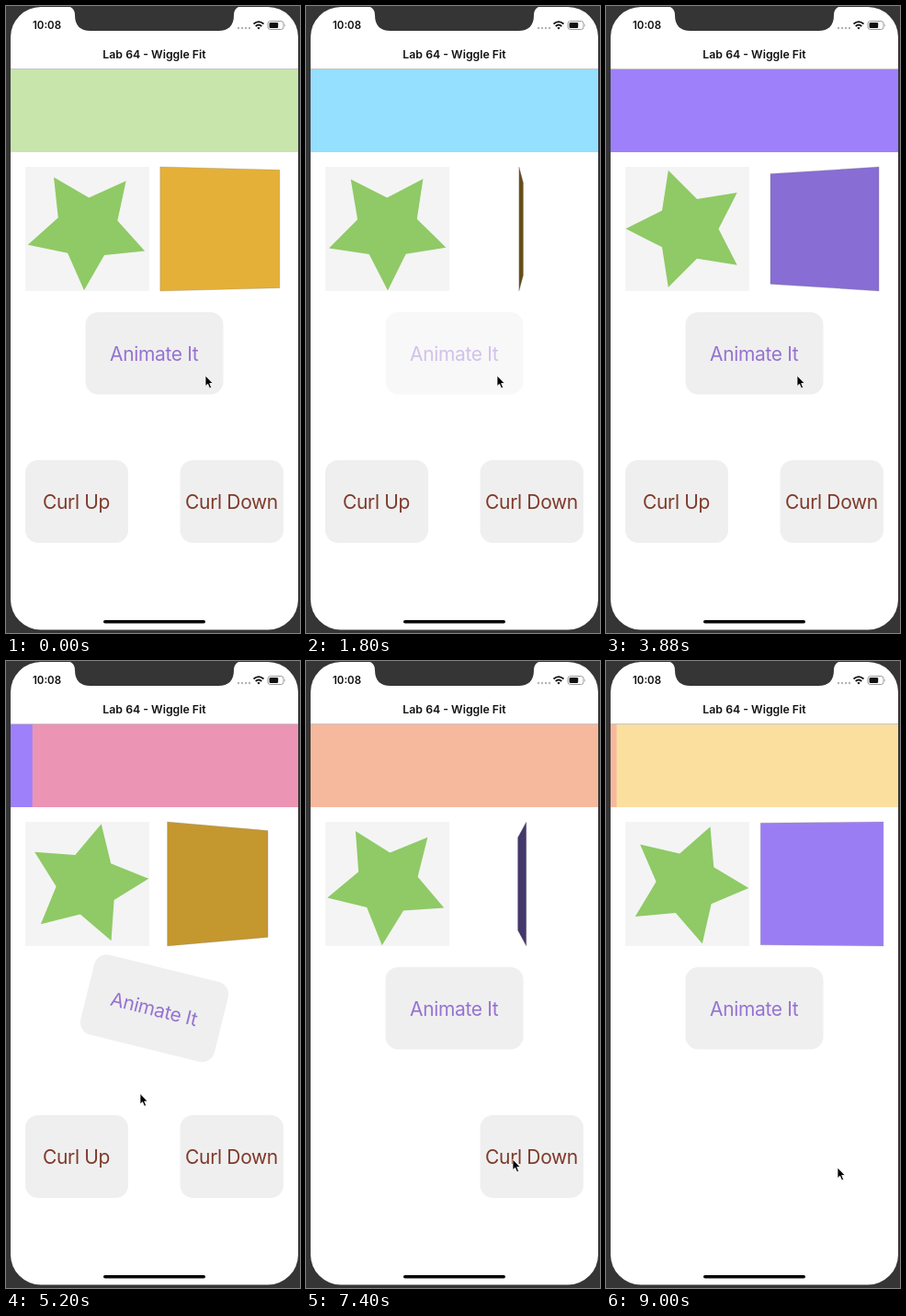
These frames come from a looping animation (320x682 px, 9040 ms). An HTML page:

```html
<!DOCTYPE html>
<html lang="en">
<head>
<meta charset="utf-8">
<title>Wiggle Fit</title>
<style>
  html, body { margin: 0; width: 100%; height: 100%; overflow: hidden; background: #353535; }
  svg { display: block; width: 100vw; height: 100vh; }
  text { font-family: Inter, Roboto, sans-serif; text-anchor: middle; }
  .label { font-size: 21px; letter-spacing: -.35px; }
  .bold { font-weight: 600; fill: #111; }
</style>
</head>
<body>
<svg viewBox="0 0 320 682" preserveAspectRatio="none">
  <defs>
    <clipPath id="screen"><rect x="5" y="1" width="313" height="677.5" rx="33"/></clipPath>
    <clipPath id="upClip"><rect x="20" y="493" width="114" height="92"/></clipPath>
    <clipPath id="downClip"><rect x="188.5" y="493" width="114.5" height="92"/></clipPath>
    <linearGradient id="flap" x2="0" y2="1">
      <stop offset="0" stop-color="#d2d2d2"/>
      <stop offset=".25" stop-color="#f8f8f8"/>
      <stop offset=".7" stop-color="#fff"/>
      <stop offset="1" stop-color="#cfcfcf"/>
    </linearGradient>
  </defs>
  <rect width="320" height="682" fill="#353535"/>
  <g clip-path="url(#screen)">
    <rect width="320" height="682" fill="#fff"/>
    <path d="M66 0Q75 1 75 10Q75 27 92 27H231Q248 27 248 10Q248 1 257 0Z" fill="#353535"/>
    <text class="bold" x="44.5" y="25" font-size="11.5">10:08</text>
    <g fill="#b5b5b5">
      <circle cx="253" cy="24" r="1.2"/><circle cx="257" cy="24" r="1.2"/>
      <circle cx="261" cy="24" r="1.2"/><circle cx="265" cy="24" r="1.2"/>
    </g>
    <g fill="none" stroke="#111" stroke-width="1.7">
      <path d="M269.5 19.5Q275 14.7 280.5 19.5M271.7 22Q275 19 278.3 22"/>
      <path d="M275 25.5L273.3 23.7Q275 22.4 276.7 23.7Z" fill="#111" stroke="none"/>
    </g>
    <rect x="285" y="16.5" width="17" height="9" rx="2.6" fill="none" stroke="#999"/>
    <rect x="286.6" y="18" width="9.6" height="6" rx="1.3" fill="#111"/>
    <path d="M303.3 19.3Q305 21 303.3 22.7Z" fill="#999"/>
    <text class="bold" x="161.5" y="56.5" font-size="12.3">Lab 64 - Wiggle Fit</text>
    <rect x="5" y="68" width="313" height="1" fill="#c4c4c4"/>

    <rect id="oldColor" x="5" y="69" width="313" height="90"/>
    <rect id="newColor" y="69" width="313" height="90"/>

    <rect x="21" y="175" width="135" height="135" fill="#f4f4f4"/>
    <polygon id="star" fill="#8fca66"/>
    <polygon id="card" stroke="#777" stroke-opacity=".35" stroke-width=".8"/>

    <g id="animate">
      <rect x="86.5" y="333" width="150" height="89.5" rx="14" fill="#efefef"/>
      <text class="label" x="161.2" y="386" fill="#9673d1">Animate It</text>
    </g>
    <g id="up" clip-path="url(#upClip)">
      <rect x="21" y="494" width="112" height="90" rx="14" fill="#efefef"/>
      <text class="label" x="76.5" y="547" fill="#7e3a2a">Curl Up</text>
      <g transform="translate(77 539) rotate(-20)">
        <rect class="blank" x="-100" width="200" height="220" fill="#fff"/>
        <rect class="flap" x="-100" width="200" height="22" fill="url(#flap)"/>
      </g>
    </g>
    <g id="down" clip-path="url(#downClip)">
      <rect x="189.5" y="494" width="112.5" height="90" rx="14" fill="#efefef"/>
      <text class="label" x="245.5" y="547" fill="#7e3a2a">Curl Down</text>
      <g transform="translate(245.7 539) rotate(-20)">
        <rect class="blank" x="-100" width="200" height="220" fill="#fff"/>
        <rect class="flap" x="-100" width="200" height="22" fill="url(#flap)"/>
      </g>
    </g>
    <rect x="106" y="668" width="111" height="3.6" rx="1.8" fill="#050505"/>
  </g>
  <path id="cursor" d="M0 0V11.5L2.6 9.2L4.6 13.8L6.6 12.9L4.7 8.5H8.2Z" fill="#000" stroke="#fff" stroke-width=".8"/>
</svg>
<script>
const LOOP = 9.04;
const $ = selector => document.querySelector(selector);
const set = (el, attrs) => { for (const k in attrs) el.setAttribute(k, attrs[k]); };
const clamp = x => Math.min(1, Math.max(0, x));
const rad = deg => deg * Math.PI / 180;

// cubic-bezier(.42, 0, .58, 1)
function ease(x) {
  x = clamp(x);
  let lo = 0, hi = 1, s = x;
  for (let i = 0; i < 24; i++) {
    const bx = 3 * s * (1 - s) * (.42 * (1 - s) + .58 * s) + s ** 3;
    if (bx < x) lo = s; else hi = s;
    s = (lo + hi) / 2;
  }
  return s * s * (3 - 2 * s);
}

// Out and back again, each way lasting `span`
const thereAndBack = (t, start, span) => ease(1 - Math.abs((t - start) / span - 1));

const BANNER = ['#c8e5ac', '#95dfff', '#9e80fb', '#ec94b4', '#f6b99d', '#fbdf9f'];
function drawBanner(t) {
  const period = 1.838, slide = 1.38, first = -1.428;
  const i = Math.floor((t - first) / period);
  const shown = ease((t - first - i * period) / slide);
  set($('#oldColor'), { fill: BANNER[Math.max(0, i - 1)] });
  set($('#newColor'), { fill: BANNER[i], x: 5 + 313 * (1 - shown) });
}

function drawStar(t) {
  const points = [];
  for (let k = 0; k < 10; k++) {
    const a = rad(21 + 78.1 * t + 36 * k), r = k % 2 ? 34 : 67;
    points.push([88.5 + r * Math.cos(a), 242.4 + r * Math.sin(a)]);
  }
  set($('#star'), { points: points.join(' ') });
}

function drawCard(t) {
  const half = 67.5, depth = 400, cx = 234.5, cy = 242.5;
  const u = Math.abs((t - 5.975) / 2.77) % 2;
  const angle = 180 * ease(u > 1 ? 2 - u : u);
  const nearX = -half * Math.cos(rad(angle));
  const far = depth / (depth + 2 * half * Math.sin(rad(angle)));
  const light = 1 - .6 * (1 - Math.abs(angle - 90) / 90);
  const color = angle < 90 ? [243, 187, 58] : [158, 128, 248];
  const corner = (scale, sx, sy) => [cx + sx * nearX * scale, cy + sy * half * scale];
  set($('#card'), {
    points: [corner(1, 1, -1), corner(far, -1, -1), corner(far, -1, 1), corner(1, 1, 1)].join(' '),
    fill: `rgb(${color.map(c => Math.round(c * light))})`
  });
}

function drawButton(t) {
  set($('#animate'), {
    opacity: 1 - thereAndBack(t, 1.3, .925),
    transform: `rotate(${30 * thereAndBack(t, 4.5, .46)} 161.5 377.8)`
  });
}

// The blank page lies below the fold when peeling up, above it when rolling down
function drawCurl(id, t, start, rollsDown) {
  const p = ease((t - start) / .925);
  const fold = rollsDown ? -63 + 148 * p : 85 - 148 * p;
  set($(id + ' .blank'), { y: rollsDown ? fold - 220 : fold });
  set($(id + ' .flap'), { y: fold - 22 });
  set($(id), { visibility: p < 1 ? 'visible' : 'hidden' });
}

const PATH = [
  [0, 217, 402], [.4, 217, 402], [.9, 208, 402], [4.7, 208, 402], [5.2, 146, 470.5],
  [5.75, 81, 540.5], [6.6, 81, 540.5], [7.25, 225, 542], [7.9, 225, 542], [8.5, 252, 551], [LOOP, 252, 551]
];
function drawCursor(t) {
  const i = PATH.findIndex(stop => stop[0] > t);
  const [t0, x0, y0] = PATH[i - 1], [t1, x1, y1] = PATH[i];
  const p = (t - t0) / (t1 - t0);
  set($('#cursor'), { transform: `translate(${x0 + (x1 - x0) * p} ${y0 + (y1 - y0) * p})` });
}

function draw(t) {
  drawBanner(t);
  drawStar(t);
  drawCard(t);
  drawButton(t);
  drawCurl('#up', t, 6.25, false);
  drawCurl('#down', t, 7.6, true);
  drawCursor(t);
}

const begin = performance.now();
function tick() {
  const ms = (performance.now() - begin) % (LOOP * 1000);
  draw(Math.floor(ms / 40) * .04);
  requestAnimationFrame(tick);
}
tick();
</script>
</body>
</html>
```
